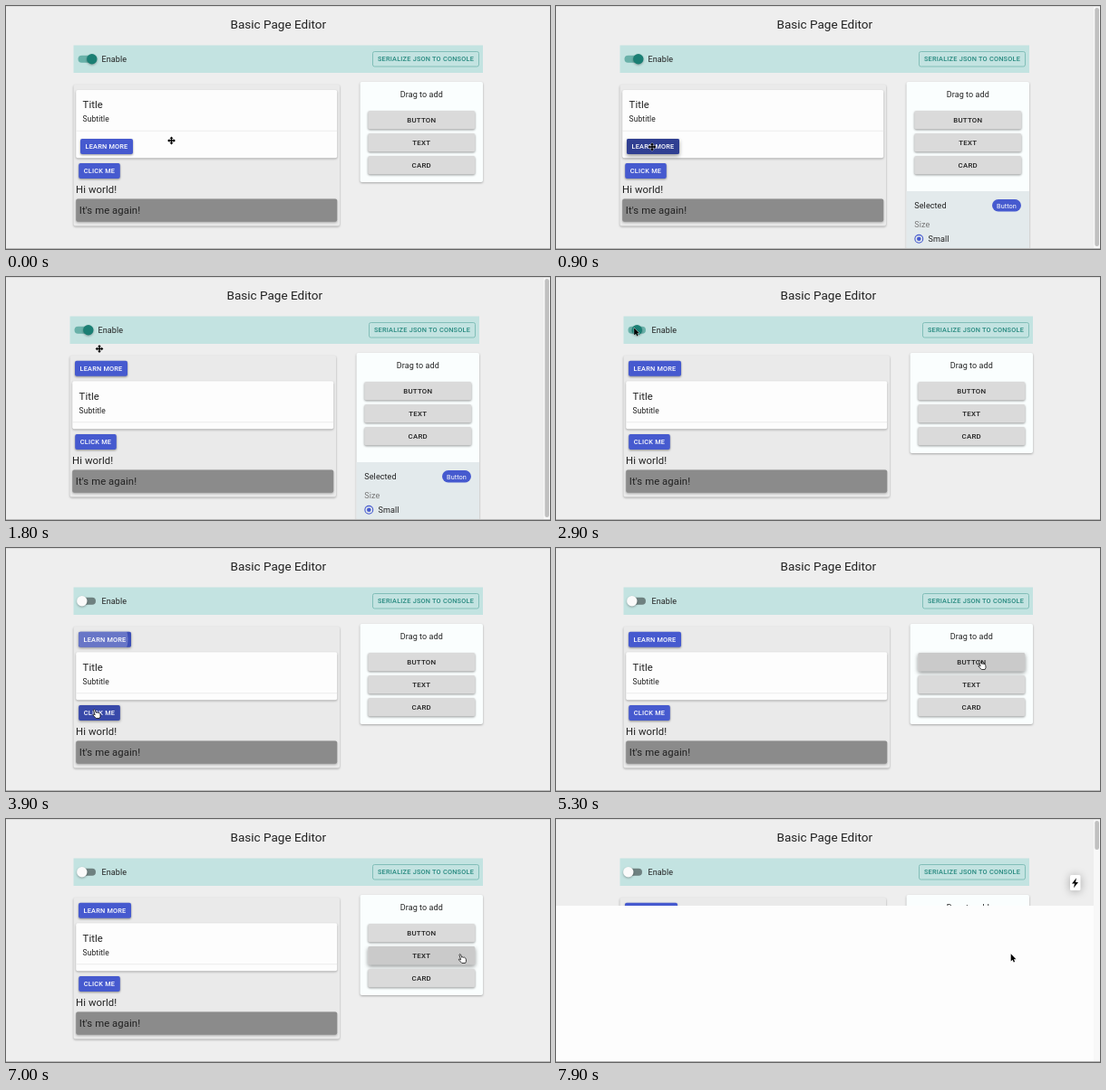
Recreate the animation shown at these times as an HTML page. Size 600x269 px, loop 8 s.

```html
<!DOCTYPE html>
<html lang="en">
<head>
<meta charset="utf-8">
<title>Basic Page Editor</title>
<style>
html, body { margin: 0; width: 100%; height: 100%; overflow: hidden; background: #eee; }
svg { display: block; width: 600px; height: 269px; }
text { font: 9.03px Roboto, sans-serif; letter-spacing: .0094em; fill: #212121; }
.big { font-size: 11.3px; letter-spacing: .0075em; }
.small { font-size: 7.34px; letter-spacing: .0286em; font-weight: 500; }
.wide { font-size: 7.9px; letter-spacing: .0286em; font-weight: 500; }
.mid { text-anchor: middle; }
.paper { filter: drop-shadow(0 1px 1px rgba(0,0,0,.3)); }
.btn { filter: drop-shadow(0 1px 1px rgba(0,0,0,.4)); }
.blue .face { fill: #465acf; }
.blue .hover { fill: #303f91; }
.blue text { fill: #fff; }
.grey .face { fill: #dadada; }
.grey .hover { fill: #cacaca; }
.black { stroke: #fff; stroke-width: .7; paint-order: stroke; }
</style>
</head>
<body>
<svg viewBox="0 0 600 269">
  <rect width="600" height="269" fill="#eee"/>
  <g id="page">
    <text class="mid" x="300.3" y="25.3" style="font-size:13.55px;letter-spacing:0">Basic Page Editor</text>

    <rect x="74.5" y="43.5" width="451.5" height="30.5" fill="#c3e3e1"/>
    <rect id="track" x="79.5" y="54.7" width="19.5" height="8" rx="4"/>
    <circle id="knob" class="paper" cy="58.7" r="5.7"/>
    <text x="105.6" y="61.8">Enable</text>
    <rect x="404.5" y="50.5" width="117" height="16.5" rx="2" fill="none" stroke="#71b5ae" stroke-width=".8"/>
    <text class="small mid" x="463" y="61.4" style="fill:#26897f">SERIALIZE JSON TO CONSOLE</text>

    <rect class="paper" x="74.5" y="87" width="293.5" height="156.5" rx="2" fill="#eaeaea"/>
    <rect id="card" class="paper" x="77.2" width="288" rx="2" fill="#fdfdfd"/>
    <g id="cardText">
      <text class="big" x="84.6" y="113.2">Title</text>
      <text x="84.6" y="128.1" style="font-size:8.47px">Subtitle</text>
      <path d="M77.2 138.2h288" stroke="#e6e6e6" stroke-width=".7"/>
    </g>
    <text class="big" x="77.1" y="207">Hi world!</text>
    <rect class="paper" x="77.2" y="213.5" width="288" height="25.3" rx="2" fill="#8b8b8b"/>
    <text class="big" x="80.8" y="230.2">It's me again!</text>

    <rect id="panel" class="paper" x="390.5" y="84" width="135.5" rx="2" fill="#fafefe"/>
    <text class="mid" x="458.3" y="100.8">Drag to add</text>
    <g id="settings">
      <rect x="390.5" y="205" width="135.5" height="64" fill="#e3eaec"/>
      <text x="399.3" y="224">Selected</text>
      <rect x="485" y="214" width="32" height="13.6" rx="6.8" fill="#465acf"/>
      <text class="mid" x="501" y="223.5" style="font-size:7.34px;fill:#fff">Button</text>
      <text x="399.3" y="245.2" style="fill:#777">Size</text>
      <circle cx="404.3" cy="257.8" r="4.4" fill="none" stroke="#465acf" stroke-width="1.1"/>
      <circle cx="404.3" cy="257.8" r="2.3" fill="#465acf"/>
      <text x="414.5" y="261">Small</text>
    </g>
    <g id="buttons"></g>
    <clipPath id="learnClip"><rect x="80" y="92.7" width="58" height="17" rx="2"/></clipPath>
    <circle id="ripple" cx="107" cy="101" fill="#fff" clip-path="url(#learnClip)"/>
  </g>

  <g id="reload">
    <rect y="96" width="600" height="173" fill="#fdfdfd"/>
    <rect x="567" y="62" width="11.5" height="17" rx="1.5" fill="#fff" style="filter:drop-shadow(0 1px 5px rgba(0,0,0,.3))"/>
    <path d="M574 65.3l-5 6.2h3l-1 4.7 5-6.2h-3z"/>
  </g>
  <g id="scroll">
    <rect x="593" y="1" width="7" height="267" fill="#f8f8f8"/>
    <rect id="thumb" x="594.3" y="2" width="4.7" rx="2.3" fill="#c0c0c0"/>
  </g>
  <rect width="600" height="1" fill="#dcdcdc"/>
  <rect y="268" width="600" height="1" fill="#b8b8b8"/>

  <g id="cursor">
    <path id="move" class="black" d="M0-4.4l2 2.2h-1.3v1.5h1.5v-1.3l2.2 2-2.2 2v-1.3h-1.5v1.5h1.3l-2 2.2-2-2.2h1.3v-1.5h-1.5v1.3l-2.2-2 2.2-2v1.3h1.5v-1.5h-1.3z"/>
    <path id="hand" fill="#fff" stroke="#111" stroke-width=".8" stroke-linejoin="round" d="M-2.6-3.8q.9-1.3 1.7 0l1.1 3 .8-.4 1.1.5.9-.2.8.7q1 .3 1.1 1.6l.1 2.2-.9 1.9h-3.8l-3.4-3.6q-.4-1.2 1.5-.6l.8.6z"/>
    <path id="arrow" class="black" d="M-.8-4.8v8.2l1.9-1.7 1.2 2.8 1.3-.6-1.2-2.7h2.5z"/>
  </g>
</svg>
<script>
const $ = id => document.getElementById(id);
const LOOP = 8000, STEP = 100;

function button(kind, label, x, y, w, h) {
  const g = document.createElementNS('http://www.w3.org/2000/svg', 'g');
  const box = `width="${w}" height="${h}" rx="2"`;
  const [font, size] = kind === 'blue' ? ['small', 7.34] : ['wide', 7.9];
  g.setAttribute('class', 'btn ' + kind);
  g.innerHTML = `<rect class="face" ${box}/><rect class="hover" ${box}/>` +
    `<text class="mid ${font}" x="${w / 2}" y="${h / 2 + size * .355}">${label}</text>`;
  $('buttons').append(g);
  place(g, x, y);
  return g;
}
function place(el, x, y) {
  el.setAttribute('transform', `translate(${x} ${y})`);
}
function show(el, on) {
  el.style.display = on ? '' : 'none';
}

const learn = button('blue', 'LEARN MORE', 80, 92.7, 58, 17);
const hovers = [
  [learn, [300, 1100], [3100, 3750]],
  [button('blue', 'CLICK ME', 80.2, 174, 45.6, 17), [3750, 4400]],
  [button('grey', 'BUTTON', 399.3, 116, 118, 20.2), [5000, 5700]],
  [button('grey', 'TEXT', 399.3, 141, 118, 20.2), [5700, 6050], [6500, 7600]],
  [button('grey', 'CARD', 399.3, 166, 118, 20.2), [6050, 6500]]
];
const ghost = button('blue', 'LEARN MORE', 0, 0, 58, 17);
ghost.style.opacity = .6;
ghost.querySelector('.hover').style.opacity = 0;

// time, x, y, cursor shape from then on
const path = [
  [0, 182.5, 149, 'move'], [500, 106, 156, 'move'], [1000, 106, 156, 'move'],
  [1500, 104, 83, 'move'], [1800, 103, 79.5, 'move'], [2000, 103, 79.5, 'arrow'],
  [2500, 87, 61, 'hand'], [2900, 87, 61, 'arrow'], [3200, 108, 101, 'hand'],
  [3600, 107, 101, 'hand'], [3900, 99, 183, 'hand'], [4400, 99, 184, 'arrow'],
  [4700, 190, 204, 'arrow'], [5100, 469, 129, 'hand'], [5500, 469, 129, 'hand'],
  [5900, 486, 152, 'hand'], [6200, 488, 177, 'hand'], [6400, 488, 177, 'hand'],
  [6800, 502.5, 154, 'hand'], [7600, 502.5, 154, 'arrow'], [LOOP, 502.5, 154, 'arrow']
];

const ramp = (t, from, to) => Math.min(1, Math.max(0, (t - from) / (to - from)));
const smooth = p => p * p * (3 - 2 * p);

function cursorAt(t) {
  const i = path.findIndex(p => p[0] > t);
  const [t0, x0, y0, shape] = path[i - 1], [t1, x1, y1] = path[i];
  const p = smooth(ramp(t, t0, t1));
  return [x0 + (x1 - x0) * p, y0 + (y1 - y0) * p, shape];
}

function draw(t) {
  const selected = t >= 700 && t < 2900;
  const dropped = t >= 1600;
  const reloaded = t >= 7600;
  const shift = selected || reloaded ? -4 : 0;
  const [x, y, shape] = cursorAt(t);

  place($('page'), shift, 0);
  place($('cursor'), x, y);
  for (const id of ['move', 'hand', 'arrow']) show($(id), id === shape);

  const off = smooth(ramp(t, 2800, 3000));
  $('knob').setAttribute('cx', 94.8 - 11 * off);
  $('knob').setAttribute('fill', off > .5 ? '#fafafa' : '#1b7f74');
  $('track').setAttribute('fill', off > .5 ? '#6e8180' : '#69b1a9');

  $('card').setAttribute('y', dropped ? 115.2 : 93);
  $('card').setAttribute('height', dropped ? 53 : 75.2);
  place($('cardText'), 0, dropped ? 22.5 : 0);
  if (dropped) place(learn, 80, 92.7);
  else place(learn, 82, 147);
  show(ghost, t >= 1100 && !dropped);
  place(ghost, x - shift - 28, y - 9);

  for (const [el, ...spans] of hovers) {
    const level = Math.max(...spans.map(([a, b]) => ramp(t, a, a + 250) * (1 - ramp(t, b, b + 250))));
    el.querySelector('.hover').style.opacity = level;
    el.style.filter = `drop-shadow(0 ${1 + level}px ${1 + level}px rgba(0,0,0,.4))`;
  }
  const grow = ramp(t, 3600, 4100);
  $('ripple').setAttribute('r', 46 * grow);
  $('ripple').style.opacity = .3 * (1 - ramp(t, 3800, 4200));

  $('panel').setAttribute('height', selected ? 185 : 111);
  show($('settings'), selected);
  show($('reload'), reloaded);
  show($('scroll'), selected || reloaded);
  $('thumb').setAttribute('height', reloaded ? 32 : 264);
}

const start = performance.now();
function tick(now) {
  const t = Math.max(0, now - start) % LOOP;
  draw(Math.floor(t / STEP) * STEP);
  requestAnimationFrame(tick);
}
draw(0);
requestAnimationFrame(tick);
</script>
</body>
</html>
```
